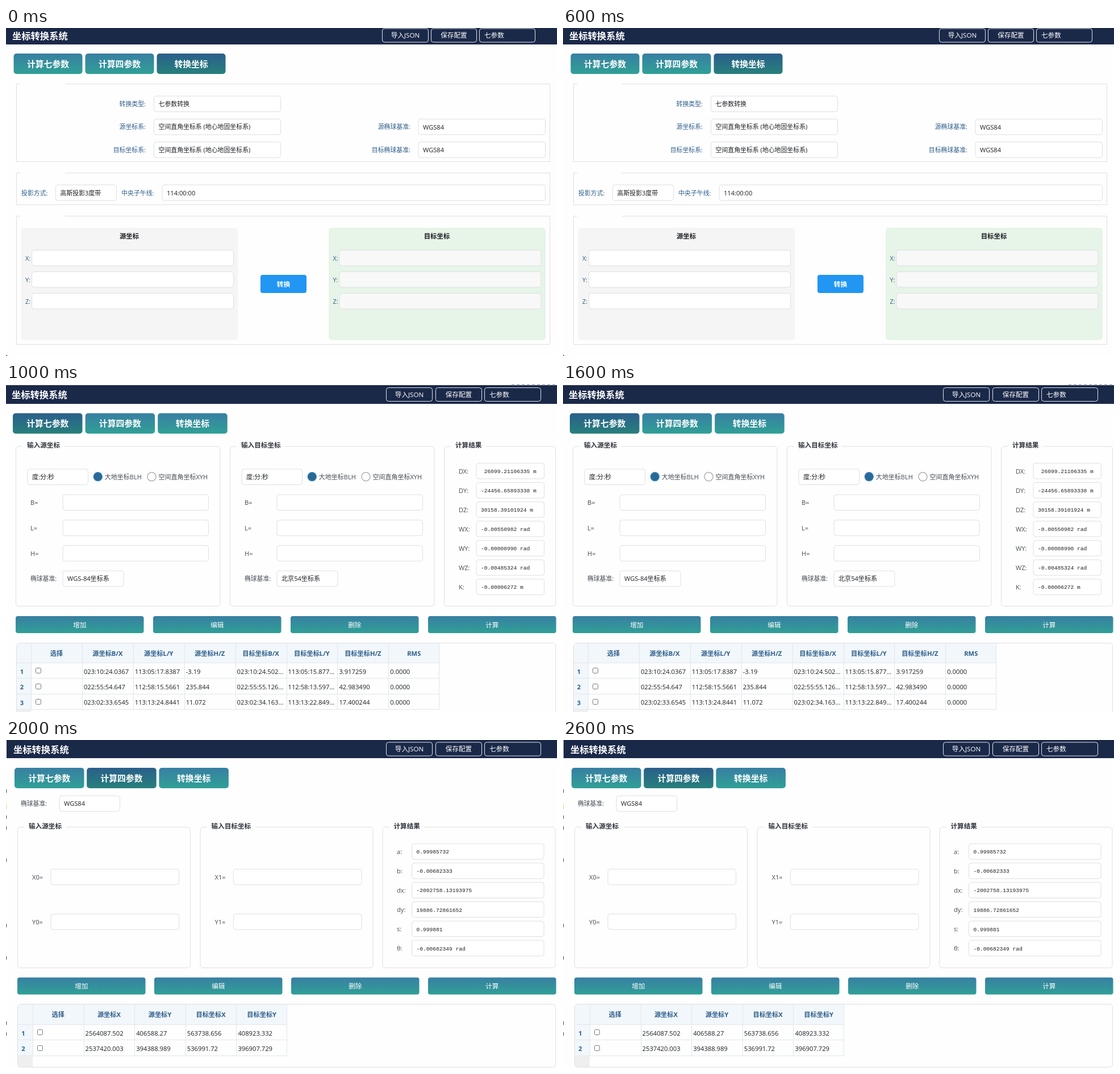
Animation, 970 px wide and 578 px high, one loop 3 s. Source, as an HTML page with a canvas:

```html
<!DOCTYPE html>
<html lang="zh-CN">
<head>
<meta charset="utf-8">
<title>坐标转换系统</title>
<style>
html, body { margin: 0; width: 100%; height: 100%; overflow: hidden; background: #fefefe; }
canvas { display: block; }
</style>
</head>
<body>
<canvas id="stage" width="970" height="578"></canvas>
<script>
const ctx = document.getElementById('stage').getContext('2d');
const SANS = '"Open Sans", "Noto Sans CJK SC", "Noto Sans CJK", sans-serif';
const MONO = '"Liberation Mono", monospace';
const NAVY = '#1b2949', PAGE = '#fefefe', LINE = '#dedfe1', BLUE = '#2c5d8a', INK = '#1c1f24', GREY = '#444b55';

// y is the vertical middle of the line
function text(str, x, y, { size = 11.1, color = INK, align = 'left', bold = false, font = SANS } = {}) {
  ctx.font = `${bold ? 'bold ' : ''}${size}px ${font}`;
  ctx.fillStyle = color;
  ctx.textAlign = align;
  ctx.fillText(str, x, y + size * 0.37);
}

function rect(x, y, right, bottom, fill) {
  ctx.fillStyle = fill;
  ctx.fillRect(x, y, right - x, bottom - y);
}

function box(x, y, right, bottom, { fill, stroke, r = 4 }) {
  const inset = stroke ? 0.5 : 0;
  ctx.beginPath();
  ctx.roundRect(x + inset, y + inset, right - x - 2 * inset, bottom - y - 2 * inset, r);
  if (fill) { ctx.fillStyle = fill; ctx.fill(); }
  if (stroke) { ctx.strokeStyle = stroke; ctx.lineWidth = 1; ctx.stroke(); }
}

function field(x, right, mid, value = '', options = {}) {
  box(x, mid - 14, right, mid + 14.5, { fill: options.fill || '#fff', stroke: LINE });
  text(value, x + 8.5, mid + 0.5, options);
}

function gradientButton(x, y, right, bottom, label, active, style) {
  const fill = ctx.createLinearGradient(0, y, 0, bottom);
  fill.addColorStop(0, active ? '#2a5f8b' : '#387fa2');
  fill.addColorStop(1, active ? '#27807b' : '#30a096');
  box(x, y, right, bottom, { fill, r: style.r });
  text(label, (x + right) / 2, (y + bottom) / 2 + 0.5, { color: '#fff', align: 'center', ...style });
}

function header(left, top, bottom, titleX, titleY, buttons, y) {
  rect(left, top, 970, bottom, NAVY);
  text('坐标转换系统', titleX, titleY, { size: 16.3, bold: true, color: '#fff' });
  ['导入JSON', '保存配置', '七参数'].forEach((label, i) => {
    const [x, right] = buttons[i];
    box(x, y - 12, right, y + 13, { stroke: '#dfe4ec' });
    const isSelect = i === 2;
    text(label, isSelect ? x + 9 : (x + right) / 2, y + 0.5,
      { size: 11.6, color: '#fff', align: isSelect ? 'left' : 'center' });
  });
}

function tabs(x, y, width, step, active) {
  ['计算七参数', '计算四参数', '转换坐标'].forEach((label, i) => {
    const left = x + i * step;
    gradientButton(left, y, left + width, y + 36, label, i === active, { size: 14.8, bold: true, r: 5 });
  });
}

function group(x, y, right, bottom, title, gapEnd) {
  box(x, y, right, bottom, { stroke: LINE, r: title ? 5 : 0 });
  rect(x + (title ? 12 : 7), y - 1, gapEnd, y + 2, PAGE);
  if (title) text(title, x + 20, y - 1.5, { size: 11.6, bold: true, color: '#30353c' });
}

function actions(x, y) {
  ['增加', '编辑', '删除', '计算'].forEach((label, i) => {
    const left = x + i * (743 - x) / 3;
    gradientButton(left, y, left + 225.5, y + 30, label, false, { size: 11.6, r: 4 });
  });
}

function results(rows, labelX, x, right, y) {
  rows.forEach(([label, value], i) => {
    const mid = y + i * 34.05;
    text(label, labelX, mid + 0.5, { color: GREY });
    field(x, right, mid, value, { size: 9.6, font: MONO });
  });
}

function table(x, y, headBottom, firstCol, colWidth, heads, rows, bottom) {
  const rowHeight = 27.4, end = firstCol + heads.length * colWidth;
  const rowsEnd = headBottom + rows.length * rowHeight;
  box(x, y, 968, bottom, { stroke: LINE, r: 5 });
  rect(x + 1, y + 1, end, headBottom, '#f2f7fb');
  rect(x + 1, headBottom, firstCol, rowsEnd, '#f2f7fb');
  rect(x + 1, rowsEnd, firstCol, bottom - 1, '#efefef');
  heads.forEach((head, i) => {
    const left = firstCol + i * colWidth;
    rect(Math.round(left), y, Math.round(left) + 1, rowsEnd, '#dfe6ec');
    text(head, left + colWidth / 2, (y + headBottom) / 2 + 0.5, { size: 11.2, bold: true, color: BLUE, align: 'center' });
  });
  rect(Math.round(end) - 1, y, Math.round(end), rowsEnd, '#dfe6ec');
  for (let i = 0; i <= rows.length; i++) {
    const lineY = Math.round(headBottom + i * rowHeight) - 1;
    rect(x, lineY, end, lineY + 1, '#e1e7ec');
  }
  rows.forEach((cells, i) => {
    const mid = headBottom + (i + 0.5) * rowHeight + 0.7;
    text(i + 1, (x + firstCol) / 2 - 3, mid + 0.5, { bold: true, color: BLUE, align: 'center' });
    const check = Math.round(mid) - 6;
    box(firstCol + 8, check, firstCol + 18, check + 10, { fill: '#fff', stroke: '#777', r: 2 });
    cells.forEach((cell, j) => text(cell, firstCol + (j + 1) * colWidth + 3, mid, { size: 11.2 }));
  });
}

function radio(x, y, label, checked) {
  ctx.beginPath();
  ctx.arc(x, y, 7.6, 0, Math.PI * 2);
  ctx.fillStyle = checked ? '#2c6894' : '#fff';
  ctx.fill();
  ctx.lineWidth = 1.3;
  ctx.strokeStyle = checked ? '#3485c4' : '#a2a5a8';
  ctx.stroke();
  text(label, x + 12, y + 0.5, { size: 11, color: GREY });
}

function convertPage() {
  const label = (str, right, y) => text(str, right, y, { size: 10.9, color: BLUE, align: 'right' });
  const system = '空间直角坐标系 (地心地固坐标系)';
  header(0, 0, 29, 11, 14, [[662, 744], [748, 829], [833, 932]], 12.5);
  tabs(13.5, 45, 121, 126, 2);

  group(18, 98, 958, 236, '', 104);
  ['转换类型:', '源坐标系:', '目标坐标系:'].forEach((str, i) => {
    const y = 133.5 + i * 40.4;
    label(str, 246, y + 0.5);
    field(260, 484, y, i ? system : '七参数转换', { size: 10.9 });
    if (i) {
      label(i === 1 ? '源椭球基准:' : '目标椭球基准:', 712, y + 0.5);
      field(725.5, 950, y, 'WGS84');
    }
  });

  group(18, 255, 958, 312, '', 104);
  label('投影方式:', 73.5, 290.5);
  field(87, 195, 290, '高斯投影3度带', { size: 10.9 });
  label('中央子午线:', 260.5, 290.5);
  field(274.5, 950, 290, '114:00:00');

  group(18, 331, 958, 558, '', 104);
  [[26.5, '源坐标', '#f5f5f5', '#fff'], [568, '目标坐标', '#e7f4e8', '#f8f8f8']].forEach(([x, title, fill, inner]) => {
    box(x, 352, x + 382, 550, { fill, r: 5 });
    text(title, x + 190.5, 367, { size: 11.4, bold: true, align: 'center' });
    ['X:', 'Y:', 'Z:'].forEach((axis, i) => {
      const y = 405 + i * 38;
      text(axis, x + 7.5, y + 0.5, { size: 10.9, color: BLUE });
      field(x + 18.5, x + 374.5, y, '', { fill: inner });
    });
  });
  box(448, 435, 529, 467, { fill: '#2196f3' });
  text('转换', 488.5, 451.5, { size: 11.8, bold: true, color: '#fff', align: 'center' });
  rect(0, 576, 2, 578, '#3a9c95');
}

function sevenPage() {
  header(0, 2, 35, 10, 19, [[669, 751], [756, 838], [842, 942]], 18);
  for (let x = 890; x < 968; x += 9) rect(x, 0, x + 5, 1, '#8a8f9c');
  tabs(12, 51.5, 122.5, 127.6, 0);

  [[17, '输入源坐标', 103, 'WGS-84坐标系'], [394, '输入目标坐标', 491, '北京54坐标系']].forEach(([x, title, gapEnd, datum]) => {
    group(x, 109.5, x + 360.5, 392, title, gapEnd);
    field(x + 20.5, x + 128, 163.5, '度:分:秒');
    radio(x + 144.8, 163.3, '大地坐标BLH', true);
    radio(x + 239.5, 163.3, '空间直角坐标XYH', false);
    ['B=', 'L=', 'H='].forEach((str, i) => {
      const y = 208.5 + i * 44.8;
      text(str, x + 26, y + 0.5, { color: GREY });
      field(x + 82.5, x + 340, y);
    });
    text('椭球基准:', x + 26, 343.5, { size: 10.8, color: GREY });
    field(x + 82.5, x + 190.5, 342.8, datum);
  });

  group(771, 109.5, 968, 392, '计算结果', 845);
  results([
    ['DX:', ' 26099.21106335 m'], ['DY:', '-24456.65893338 m'], ['DZ:', '30158.39101924 m'],
    ['WX:', '-0.00550982 rad'], ['WY:', '-0.00008990 rad'], ['WZ:', '-0.00485324 rad'], ['K:', '-0.00006272 m']
  ], 797, 827.5, 948, 153);
  actions(17, 409);
  table(18, 456, 492, 44, 89.9,
    ['选择', '源坐标B/X', '源坐标L/Y', '源坐标H/Z', '目标坐标B/X', '目标坐标L/Y', '目标坐标H/Z', 'RMS'],
    [
      ['023:10:24.0367', '113:05:17.8387', '-3.19', '023:10:24.502...', '113:05:15.877...', '3.917259', '0.0000'],
      ['022:55:54.647', '112:58:15.5661', '235.844', '022:55:55.126...', '112:58:13.597...', '42.983490', '0.0000'],
      ['023:02:33.6545', '113:13:24.8441', '11.072', '023:02:34.163...', '113:13:22.849...', '17.400244', '0.0000']
    ], 590);
}

function fourPage() {
  header(1, 0, 32, 13, 16.5, [[669, 751], [756, 838], [842, 942]], 15.5);
  tabs(15, 49, 122.5, 127.2, 1);
  text('椭球基准:', 26, 112.5, { size: 10.8, color: GREY });
  field(93.5, 201, 111.8, 'WGS84');

  [[20, '输入源坐标', 106, 0], [341.5, '输入目标坐标', 439, 1]].forEach(([x, title, gapEnd, index]) => {
    group(x, 153, x + 305, 402, title, gapEnd);
    ['X', 'Y'].forEach((axis, i) => {
      const y = 241 + i * 79;
      text(`${axis}${index}=`, x + 26, y + 0.5, { color: GREY });
      field(x + 58.5, x + 285, y);
    });
  });

  group(662.5, 153, 967.5, 402, '计算结果', 736);
  results([
    ['a:', '0.99985732'], ['b:', '-0.00682333'], ['dx:', '-2002758.13193975'],
    ['dy:', '19886.72861652'], ['s:', '0.999881'], ['θ:', '-0.00682349 rad']
  ], 688, 714, 947.5, 196.3);
  actions(20, 418.5);
  table(20, 465, 502, 47, 89.6,
    ['选择', '源坐标X', '源坐标Y', '目标坐标X', '目标坐标Y'],
    [
      ['2564087.502', '406588.27', '563738.656', '408923.332'],
      ['2537420.003', '394388.989', '536991.72', '396907.729']
    ], 577);

  // specks of the window behind, along the left edge
  [90, 136, 155, 212, 327, 384, 499, 518].forEach(y => rect(0, y - 3, 1, y + 3, '#444'));
  rect(0, 112, 1, 122, '#f0d48a');
}

const pages = [convertPage, sevenPage, fourPage];

function draw() {
  const page = pages[Math.floor(performance.now() % 3000 / 1000)];
  rect(0, 0, 970, 578, PAGE);
  page();
  requestAnimationFrame(draw);
}
draw();
</script>
</body>
</html>
```
